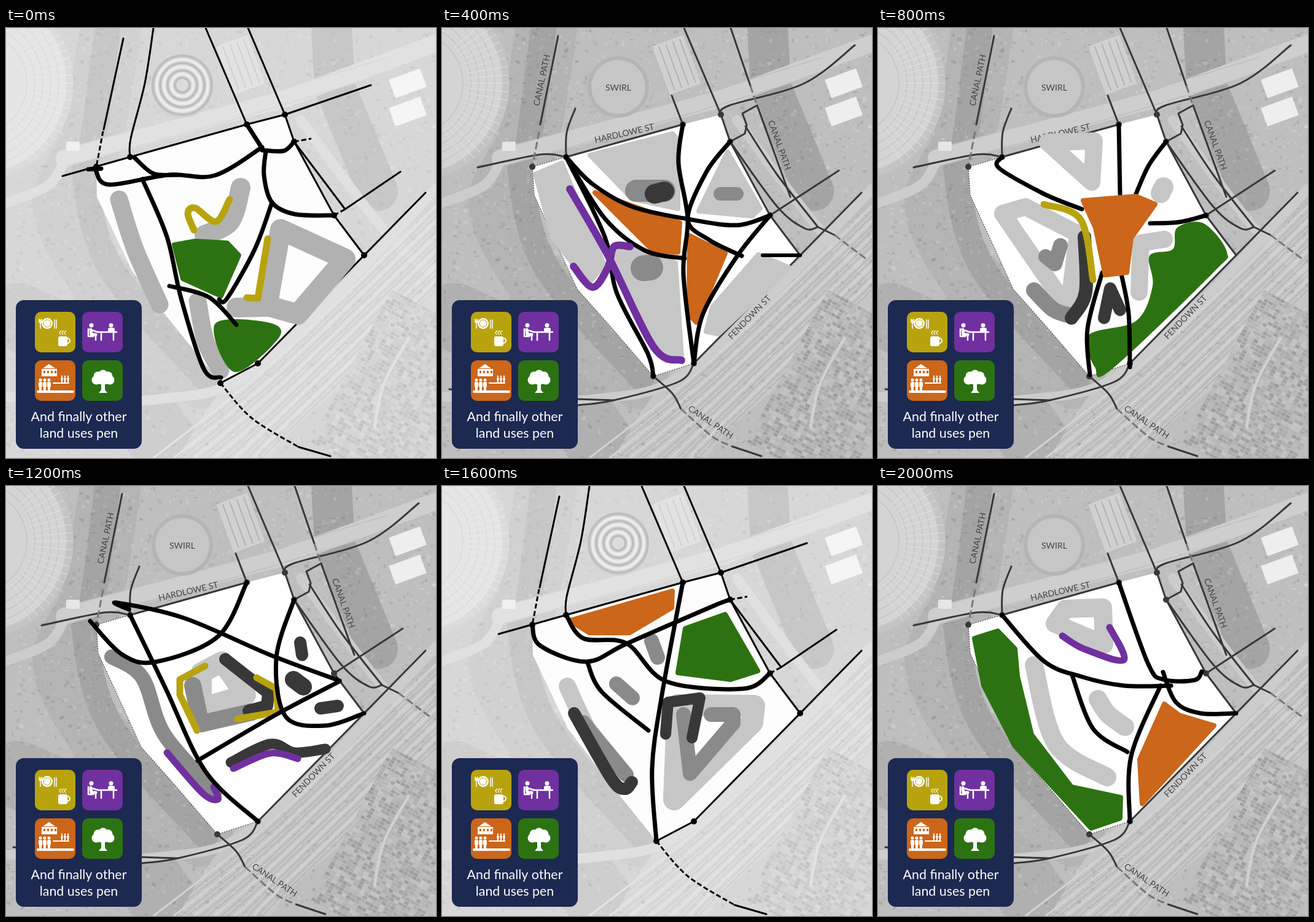
Recreate the animation shown at these times as an HTML page with a canvas. Size 700 by 700 pixels, loop 2400 ms.

```html
<!DOCTYPE html>
<html lang="en">
<head>
<meta charset="utf-8">
<title>Land use sketches</title>
<style>
html, body { margin: 0; width: 100%; height: 100%; overflow: hidden; }
canvas { display: block; }
</style>
</head>
<body>
<canvas id="stage" width="700" height="700"></canvas>
<script>
const SIZE = 700, HOLD = 400;
const GOLD = '#b8a30e', PURPLE = '#7030a0', ORANGE = '#cb661a', GREEN = '#2d7212';
const PALE = '#c6c6c6', SILVER = '#b1b1b1', MID = '#8a8a8a', DARK = '#383838';

// Junctions around the site; paths name them by letter
const NODES = {
  C: [147, 226], W: [202, 210], N: [392, 157], A: [454, 141], B: [469, 185],
  E: [534, 305], K: [583, 370], S: [410, 546], T: [344, 567], U: [349, 578]
};
let g; // context being drawn on

// ---------- helpers ----------
const parse = path => path.split(' ').map(step => NODES[step] || step.split(',').map(Number));

function trace(path, curved, closed) {
  const p = parse(path), n = p.length;
  const at = i => closed ? p[(i + n) % n] : p[Math.min(Math.max(i, 0), n - 1)];
  g.beginPath();
  g.moveTo(...p[0]);
  for (let i = 0; i < (closed ? n : n - 1); i++) {
    const [a, b, c, d] = [at(i - 1), at(i), at(i + 1), at(i + 2)];
    if (curved) {
      g.bezierCurveTo(b[0] + (c[0] - a[0]) / 6, b[1] + (c[1] - a[1]) / 6,
                      c[0] - (d[0] - b[0]) / 6, c[1] - (d[1] - b[1]) / 6, ...c);
    } else g.lineTo(...c);
  }
  if (closed) g.closePath();
}

function strokes(color, width, paths, { curved, closed, dash = [] } = {}) {
  g.strokeStyle = color;
  g.lineWidth = width;
  g.lineCap = dash.length ? 'butt' : 'round';
  g.lineJoin = 'round';
  g.setLineDash(dash);
  for (const path of paths) { trace(path, curved, closed); g.stroke(); }
  g.setLineDash([]);
}

const line = (color, width, ...paths) => strokes(color, width, paths);
const pen = (color, width, ...paths) => strokes(color, width, paths, { curved: true });
const loop = (color, width, ...paths) => strokes(color, width, paths, { closed: true });
const dashed = (color, dash, ...paths) => strokes(color, 3, paths, { curved: true, dash });
const streets = (...paths) => pen('#000', 7, ...paths);

function area(color, path, curved = false) {
  g.fillStyle = color;
  trace(path, curved, true);
  g.fill();
}

// Polygon whose corners are rounded by a marker outline
function patch(color, ...paths) {
  loop(color, 8, ...paths);
  for (const path of paths) area(color, path);
}

function disc(x, y, r, color) {
  g.fillStyle = color;
  g.beginPath();
  g.arc(x, y, r, 0, Math.PI * 2);
  g.fill();
}

function ring(x, y, r, color, width) {
  g.strokeStyle = color;
  g.lineWidth = width;
  g.beginPath();
  g.arc(x, y, r, 0, Math.PI * 2);
  g.stroke();
}

function box(x, y, w, h, r, color) {
  g.fillStyle = color;
  g.beginPath();
  g.roundRect(x, y, w, h, r);
  g.fill();
}

function turned(x, y, degrees, paint) {
  g.save();
  g.translate(x, y);
  g.rotate(degrees * Math.PI / 180);
  paint();
  g.restore();
}

function text(words, x, y, size, color, degrees = 0) {
  turned(x, y, degrees, () => {
    g.font = `${size}px Lato, sans-serif`;
    g.fillStyle = color;
    g.textAlign = 'center';
    g.textBaseline = 'middle';
    g.fillText(words, 0, 0);
  });
}

const randomizer = seed => () => (seed = seed * 16807 % 2147483647) / 2147483647;
const gray = (tone, alpha = 1) => `rgba(${tone},${tone},${tone},${alpha})`;

// ---------- aerial backdrop ----------
function aerial() {
  const random = randomizer(71);
  g.fillStyle = gray(190);
  g.fillRect(0, 0, SIZE, SIZE);

  // fields, canals and banks
  pen(gray(176), 110, '20,470 150,540 260,680');
  pen(gray(180), 100, '170,0 140,180 95,300 200,470 320,570');
  pen(gray(164), 42, '168,-20 142,180 128,235 170,390 325,570');
  line(gray(164), 66, '528,-40 535,95 605,265');
  pen(gray(198), 130, '740,340 560,490 410,620 320,760');

  // mottled ground
  for (let i = 0; i < 4200; i++) {
    g.fillStyle = gray(random() < .5 ? 90 : 245, .04 + random() * .16);
    g.fillRect(random() * SIZE, random() * SIZE, 1 + random() * 6, 1 + random() * 5);
  }

  // stadium
  disc(-50, 90, 160, gray(196));
  disc(-50, 90, 150, gray(212));
  for (let r = 84; r < 160; r += 13) ring(-50, 90, r, gray(196), 1.5);
  for (let a = -40; a < 60; a += 5) turned(-50, 90, a, () => line(gray(224), 1, '92,0 158,0'));

  // roads
  pen(gray(204), 16, '0,285 70,255 100,205', '0,600 250,604 420,545 700,262', '480,150 612,325 700,405');
  line(gray(206), 28, '95,212 200,183 455,115 700,25');
  line(gray(190), 1.5, '100,195 392,117 620,48', '100,224 392,143 620,74');

  // railway fan
  for (let k = 0; k < 18; k++) {
    pen(gray(k % 3 ? 178 : 212), k % 3 ? 1.5 : 3, `700,${290 + k * 8} 440,${540 + k * 8} ${240 + k * 11},700`);
  }

  // allotments
  turned(640, 500, 28, () => {
    for (let x = -45; x < 130; x += 8) for (let y = -60; y < 220; y += 6) {
      g.fillStyle = gray(155 + random() * 45 | 0);
      g.fillRect(x, y, 7, 5);
    }
  });
  pen(gray(208), 5, '655,505 615,580 600,650');

  // white roofs, courtyard block and tower plaza
  for (const y of [90, 136]) turned(654, y, -20, () => box(-27, -16, 54, 32, 0, gray(238)));
  turned(382, 60, -20, () => {
    box(-27, -42, 54, 84, 0, gray(208));
    for (let x = -18; x < 27; x += 12) box(x, -38, 2, 76, 0, gray(178));
  });
  box(98, 185, 22, 15, 2, gray(230));
  disc(287, 96, 50, gray(180));
  disc(287, 96, 44, gray(198));
}

// ---------- the two street maps ----------
const dots = (names, color) => { for (const name of names) disc(...NODES[name], 5, color); };

function openMap() {
  aerial();
  for (let r = 12; r < 50; r += 6) ring(287, 93, r, gray(r % 4 ? 225 : 150), 4);
  g.fillStyle = 'rgba(255,255,255,.38)';
  g.fillRect(0, 0, SIZE, SIZE);
  area('#fdfdfd', 'C W N A B E K S U 270,480 205,395 148,275');
  line('#000', 3, '191,17 159,165', '92,241 W N A 594,93', '325,0 N', '394,0 A B E K',
    'B 552,295 642,234', '683,268 K S U', '476,682 528,697');
  pen('#000', 3, '240,0 226,90 203,180 W');
  dashed('#000', [8, 4], '158,168 C', 'B 497,180', 'E 552,295', 'U 400,635 476,682');
  dots('CWNABEKSU', '#000');
}

function namedMap() {
  const bank = 'T 275,487 220,425 150,272 C';
  aerial();
  area('#fff', `W N A B E K S ${bank}`);
  strokes('#555', 1.3, [`S ${bank} W`], { dash: [2, 2] });
  line(DARK, 3, '189,13 160,157', 'W N', '374,110 N', '394,0 A B E K S', '470,0 502,94', 'E 646,232',
    'K 683,268', '567,275 513,126 489,139 496,158 493,172 B', '612,324 639,337', '472,681 520,697');
  pen(DARK, 3, '217,131 203,170 W', '58,227 160,206 W', 'A 468,126 590,90 672,28', '494,160 545,238 612,324',
    'B 545,290 590,326 612,324', 'S 385,576 280,606 222,614', '12,588 120,600 280,606', 'T 375,595 389,620');
  dashed('#777', [12, 5], '158,169 C', '502,94 512,124', '639,337 692,377', '389,620 440,665 472,681');
  dots('CWNABEST', DARK);
  const name = (words, x, y, degrees) => text(words, x, y, 14, '#444', degrees);
  name('CANAL PATH', 163, 85, -78);
  name('SWIRL', 287, 98);
  name('HARDLOWE ST', 297, 172, -13);
  name('CANAL PATH', 549, 191, 70);
  name('FENDOWN ST', 501, 471, -46);
  name('CANAL PATH', 437, 642, 34);
}

// ---------- sketches ----------
const sketches = [
  () => {
    openMap();
    pen(SILVER, 29, '184,279 210,360 250,450', '312,445 325,510 349,557');
    pen(SILVER, 32, '382,260 365,315 323,337');
    loop(SILVER, 34, '447,328 552,376 475,466 425,452');
    line(SILVER, 32, '375,455 430,454');
    patch(GREEN, '274,353 308,347 360,350 379,370 350,436 288,408');
    area(GREEN, '340,482 425,479 445,503 372,560', true);
    streets('134,230 155,229', '146,232 168,255 265,239 340,240 417,194', '417,196 N', '417,199 452,200 B',
      '210,212 240,237 278,239', '423,200 420,240 433,284 470,303 E', '433,284 405,360 360,440 347,442',
      '222,246 262,340 285,440 322,555 350,569', '266,420 330,438 375,483');
    pen(GOLD, 11, '364,279 342,315 308,293 296,302 306,329');
    line(GOLD, 11, '426,343 410,440 392,439');
  },
  () => {
    namedMap();
    patch(PALE, '241,207 375,172 384,182 384,294 310,278', '465,202 518,294 505,306 418,298',
      '285,352 380,382 390,534 365,541 281,400', '515,369 565,390 450,498 430,494 440,455', '152,238 195,220 264,385 238,417 180,340');
    pen(MID, 36, '316,265 362,265');
    line(DARK, 32, '346,270 362,266');
    line(MID, 22, '453,270 480,270');
    line(MID, 42, '328,391 339,390');
    patch(ORANGE, '249,268 387,317 384,365 345,364', '403,338 461,367 414,479 402,466');
    streets('W 245,254 310,291 400,311 480,321 E', 'W 265,340 284,430 335,530 T', 'W 265,310 330,362 395,375',
      'N 385,220 400,311 393,400 S', 'B 430,235 400,311 435,345 488,371', 'E 480,372 425,465 S');
    line('#000', 6, '522,370 K');
    pen(PURPLE, 12, '208,262 270,370 345,520 390,541', '306,356 280,356 270,390 245,422 214,388');
  },
  () => {
    namedMap();
    loop(PALE, 28, '276,186 352,184 348,251');
    loop(PALE, 28, '203,302 240,291 325,335 310,458');
    line(PALE, 28, '425,430 428,350 466,344');
    line(PALE, 32, '460,269 465,259');
    pen(MID, 26, '254,427 285,458 312,468');
    line(MID, 24, '297,354 288,384 273,372');
    pen(DARK, 22, '336,340 338,430 315,472');
    line(DARK, 20, '368,472 378,424 394,459');
    area(GREEN, '487,325 530,318 568,365 545,399 380,556 353,552 343,500 420,477 447,420 442,371 480,360', true);
    streets('W 197,228 270,270 332,295', 'N 394,270', 'B 440,225 418,275', 'E 490,316 443,318',
      '365,398 341,490 345,565', '396,400 408,465 410,552');
    patch(ORANGE, '334,281 420,274 451,287 412,342 405,398 370,402 354,325');
    pen(GOLD, 11, '270,287 330,312 350,410');
  },
  () => {
    namedMap();
    pen(MID, 24, '172,278 222,312 258,405 340,498');
    loop(PALE, 34, '318,304 352,286 390,340 318,362');
    line(MID, 28, '304,325 317,387 400,368');
    line(DARK, 20, '357,282 427,337 425,358 395,366');
    line(GOLD, 11, '324,293 283,315 283,340 311,398', '408,312 440,330 443,368 377,379');
    line(DARK, 20, '479,255 482,275', '512,362 540,358');
    line(DARK, 28, '468,315 484,327');
    pen(DARK, 17, '366,450 430,420 470,434 520,428');
    pen(PURPLE, 11, '370,460 430,435 475,444', '262,434 320,500 345,510 338,490');
    streets('137,220 190,275 245,286 345,245 N', '200,201 180,190 290,215 430,275 543,317',
      '543,318 440,372 312,447', 'B 440,280 455,375 520,390 K', 'W 260,330 325,465 S');
  },
  () => {
    openMap();
    pen(PALE, 28, '204,326 245,410 292,465');
    loop(PALE, 36, '384,357 508,358 505,385 378,510');
    area('#fdfdfd', '402,375 438,375 415,445');
    line(MID, 24, '341,252 351,279', '284,322 310,345', '230,385 300,470');
    line(MID, 24, '393,372 404,468 474,386 474,372 438,372');
    line(DARK, 18, '364,404 368,352 420,345 407,410');
    pen(DARK, 20, '215,370 275,475 297,493 309,482');
    patch(ORANGE, '208,219 375,171 374,198 305,239 240,239');
    patch(GREEN, '396,232 461,209 514,301 470,315 384,304');
    streets('C 160,260 235,286 302,256 440,196 B', 'W 230,248 300,256 365,318 490,330 E',
      'N 358,340 342,460 U', '237,288 260,335 336,398');
  },
  () => {
    namedMap();
    loop(PALE, 30, '305,200 366,198 368,258 288,224');
    pen(PALE, 30, '254,292 290,420 373,474', '358,347 374,371 402,392');
    pen(PURPLE, 11, '300,244 335,265 400,283 377,230');
    patch(GREEN, '157,248 195,236 223,265 227,310 250,405 315,490 395,507 394,541 347,557 222,422 172,325');
    patch(ORANGE, '466,355 490,373 547,390 430,517 426,445');
    streets('W 270,285 330,310 400,325 477,325', 'N 440,290 465,315 515,316 527,302',
      '464,303 485,352 525,370 K', '460,325 412,440 S', '316,308 350,395 406,433');
  }
];

// ---------- legend ----------
function person(x, y, s) {
  disc(x, y, 2.5 * s, '#fff');
  box(x - 3 * s, y + 3 * s, 6 * s, 9 * s, 2 * s, '#fff');
  box(x - 2 * s, y + 10 * s, 4 * s, 8 * s, 0, '#fff');
}

function mealIcon() {
  disc(20, 19, 9, '#fff');
  ring(20, 19, 6, GOLD, 1);
  for (const x of [9, 32, 35]) line('#fff', 1.5, `${x},13 ${x},27`);
  line('#fff', 1.5, '7,12 7,17 11,17 11,12');
  box(38, 40, 15, 16, 3, '#fff');
  ring(53, 47, 4, '#fff', 2);
  for (const x of [42, 46, 50]) pen('#fff', 1.2, `${x},37 ${x - 2},34 ${x + 1},31`);
}

function deskIcon() {
  for (const x of [15, 47]) disc(x, 22, 3.5, '#fff');
  box(42, 26, 11, 7, 3, '#fff');
  line('#fff', 5, '14,29 15,37 22,37');
  line('#fff', 2.5, '10,28 10,40 18,40', '22,38 22,46', '16,30 26,33', '25,33 56,33', '31,34 31,46', '51,34 51,46');
}

function schoolIcon() {
  area('#fff', '23,6 33,13 13,13');
  box(11, 14, 25, 12, 0, '#fff');
  for (let x = 14; x < 34; x += 6) box(x, 17, 3, 4, 0, ORANGE);
  for (const x of [9, 16, 23]) person(x, 32, 1);
  for (const x of [44, 49, 54]) person(x, 26, .55);
  line('#fff', 2, '30,37 55,37');
  line('#fff', 4, '5,51 62,51');
}

function treeIcon() {
  for (let a = 0; a < 5; a++) disc(34 - 11 * Math.cos(a * Math.PI / 4), 32 - 9 * Math.sin(a * Math.PI / 4), 7.5, '#fff');
  box(23, 24, 22, 15, 7, '#fff');
  area('#fff', '31,36 37,36 37,48 41,53 27,53 31,48');
}

function legend() {
  box(16, 443, 205, 242, 13, '#1c2951');
  const tiles = [[GOLD, mealIcon], [PURPLE, deskIcon], [ORANGE, schoolIcon], [GREEN, treeIcon]];
  tiles.forEach(([color, icon], i) => turned(47 + i % 2 * 77, i < 2 ? 462 : 541, 0, () => {
    box(0, 0, 66, 66, 10, color);
    icon();
  }));
  text('And finally other', 118.5, 633, 21.4, '#fff');
  text('land uses pen', 118.5, 660, 21.4, '#fff');
}

// ---------- playback ----------
function render(sketch) {
  const canvas = document.createElement('canvas');
  canvas.width = canvas.height = SIZE;
  g = canvas.getContext('2d');
  sketch();
  legend();
  return canvas;
}

const pictures = sketches.map(render);
const stage = document.getElementById('stage').getContext('2d');
const started = performance.now();

function show() {
  const time = performance.now() - started;
  stage.drawImage(pictures[Math.floor(time / HOLD) % pictures.length], 0, 0);
  requestAnimationFrame(show);
}
show();
</script>
</body>
</html>
```
